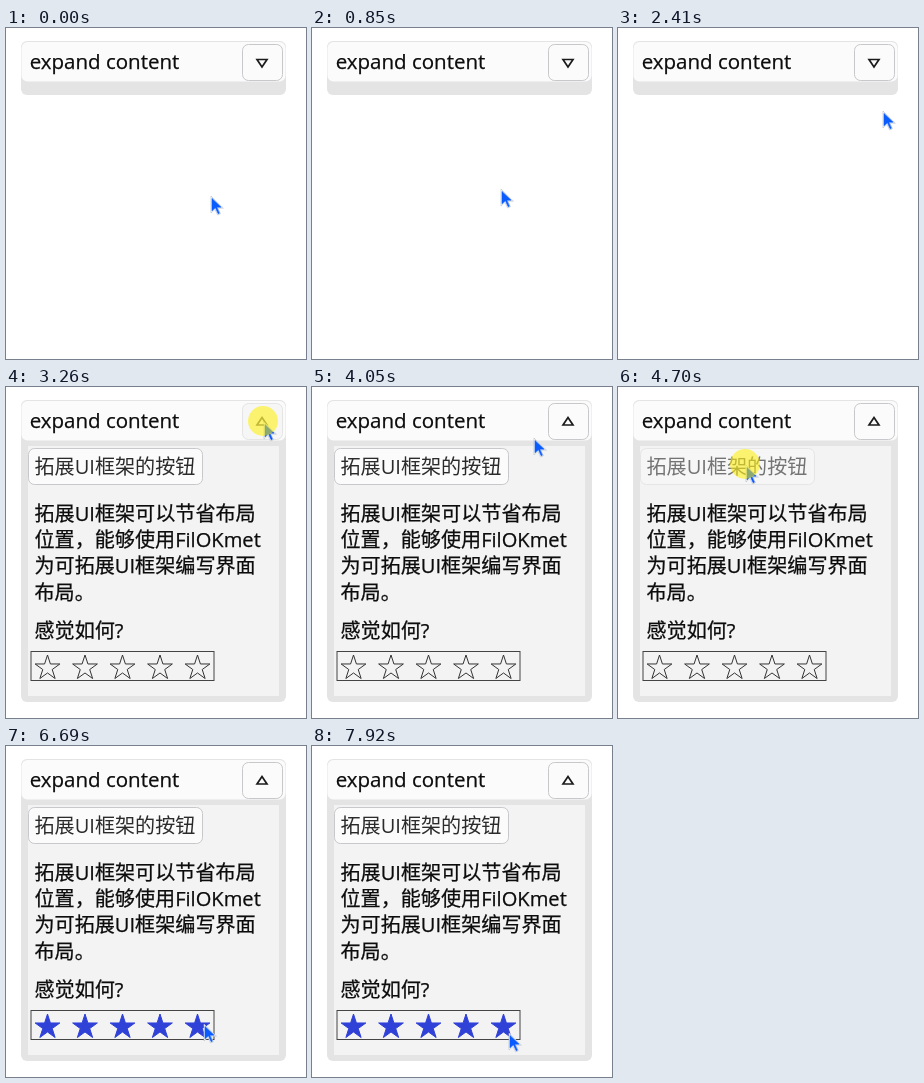
An HTML page that plays this animation: 300 px wide and 331 px high, repeating every 7990 ms.

```html
<!DOCTYPE html>
<html lang="zh-CN">
<head>
<meta charset="utf-8">
<style>
  html, body { margin: 0; width: 100%; height: 100%; overflow: hidden; background: #fff; }
  svg { display: block; font: 20.1px "Open Sans", "Noto Sans CJK SC", "Noto Sans CJK", sans-serif; }
  text { fill: #0c0c0c; stroke: #0c0c0c; stroke-width: .25; }
  .button rect { fill: #fbfbfb; stroke: #c8c8cc; }
  .button text { fill: #2b2b2b; stroke: none; }
  .button path { fill: none; stroke: #1b1b1b; stroke-width: 1.7; }
  .hover rect { fill: #f6f6f6; stroke: #e5e5e5; }
  .pressed text { fill: #747474; }
  .pressed path { stroke: #747474; }
  #stars path { fill: none; stroke: #333; }
  #stars.lit path { fill: #3041d8; stroke: #3041d8; }
  #ring { fill: #fff000; opacity: .55; }
</style>
</head>
<body>
<svg width="300" height="331" viewBox="0 0 300 331">
  <rect id="panel" x="15" y="13" width="265" height="54" rx="6" fill="#e4e4e4"/>
  <rect x="15.5" y="14" width="264" height="39.5" rx="6" fill="#fbfbfb"/>
  <text x="23.7" y="41" font-size="20.5">expand content</text>
  <g id="toggle" class="button">
    <rect x="236.5" y="16.5" width="40" height="36" rx="6"/>
    <path id="arrow"/>
  </g>
  <g id="content">
    <rect x="22" y="59" width="251" height="250" fill="#f3f3f3"/>
    <g id="action" class="button">
      <rect x="22.5" y="61.5" width="174" height="36" rx="6"/>
      <text x="28.5" y="87">拓展UI框架的按钮</text>
    </g>
    <text y="134">
      <tspan x="28.5">拓展UI框架可以节省布局</tspan>
      <tspan x="28.5" dy="26.2">位置，能够使用FilOKmet</tspan>
      <tspan x="28.5" dy="26.2">为可拓展UI框架编写界面</tspan>
      <tspan x="28.5" dy="26.2">布局。</tspan>
    </text>
    <text x="28.5" y="250.5">感觉如何?</text>
    <rect x="25" y="264.5" width="183" height="29" fill="none" stroke="#444"/>
    <g id="stars"></g>
  </g>
  <g id="cursor">
    <path d="M0 0V17L4 13.4L6.6 19L9.4 17.8L7 12.2H12.4Z" fill="#fff" stroke="#b4bcc8" stroke-width=".6"/>
    <path id="pointer" d="M1 2.4V14.8L4.4 11.8L7.2 17.8L8.4 17.2L5.8 11.2H10.2Z" stroke-width=".6"/>
    <circle id="ring" cx="-1" cy="-1" r="15"/>
  </g>
</svg>
<script>
const LOOP = 7990, STEP = 70, EXPAND = 3260, PRESS = 4700, HOLD = 500;
const BEND = 0.08;

// Where the pointer goes: start and end time, then the point it reaches
const start = { x: 205, y: 168 };
const moves = [
  { begin: 70, end: 190, x: 188, y: 163 },
  { begin: 850, end: 1330, x: 268, y: 38 },
  { begin: 1940, end: 2080, x: 265, y: 84 },
  { begin: 2410, end: 2900, x: 258, y: 35 },
  { begin: 3780, end: 4440, x: 128, y: 78 },
  { begin: 5380, end: 6010, x: 190, y: 217 },
  { begin: 6200, end: 6760, x: 197, y: 281 },
  { begin: 7170, end: 7380, x: 191, y: 280 },
  { begin: 7780, end: 7920, x: 197, y: 287 }
];
const clicks = [520, EXPAND, PRESS, 7580], CLICK_TIME = 140;

const [panel, toggle, arrow, content, action, stars, ring, cursor, pointer] =
  ["panel", "toggle", "arrow", "content", "action", "stars", "ring", "cursor", "pointer"]
    .map(id => document.getElementById(id));

function starPath(cx, cy, radius) {
  const points = Array.from({ length: 10 }, (_, i) => {
    const r = i % 2 ? radius * 0.382 : radius, a = i * Math.PI / 5;
    return (cx + r * Math.sin(a)).toFixed(2) + " " + (cy - r * Math.cos(a)).toFixed(2);
  });
  return `<path d="M${points.join("L")}Z"/>`;
}
for (let i = 0; i < 5; i++) stars.innerHTML += starPath(41.5 + 37.5 * i, 281, 13);

function pointerAt(t) {
  const last = moves.findLastIndex(move => t >= move.begin);
  if (last < 0) return start;
  const to = moves[last], from = moves[last - 1] || start;
  if (t >= to.end) return to;
  const elapsed = (Math.floor((t - to.begin) / STEP) + 0.5) * STEP;
  const u = Math.min(1, elapsed / (to.end - to.begin + STEP / 2));
  const p = u * u * (3 - 2 * u), bow = BEND * 6.75 * p * p * (1 - p);
  const dx = to.x - from.x, dy = to.y - from.y;
  return {
    x: Math.round(from.x + dx * p + dy * bow),
    y: Math.round(from.y + dy * p - dx * bow)
  };
}

function setButton(button, over, t, press) {
  const release = press + HOLD;
  button.classList.toggle("hover", over && t < release);
  button.classList.toggle("pressed", t >= press && t < release);
}

function render(t) {
  const { x, y } = pointerAt(t);
  const inside = (left, top, right, bottom) => x >= left && x <= right && y >= top && y <= bottom;
  const open = t >= EXPAND;
  const clicking = clicks.some(at => t >= at && t < at + CLICK_TIME);

  panel.setAttribute("height", open ? 302 : 54);
  content.style.display = open ? "" : "none";
  arrow.setAttribute("d", open ? "M251 38H261L256 30.5Z" : "M251 31.5H261L256 39Z");
  setButton(toggle, inside(236, 16, 277, 53), t, EXPAND);
  setButton(action, inside(22, 61, 197, 98), t, PRESS);
  stars.classList.toggle("lit", inside(25, 264, 209, 294));

  cursor.setAttribute("transform", `translate(${x} ${y})`);
  ring.style.display = clicking ? "" : "none";
  pointer.style.fill = pointer.style.stroke = clicking ? "#0050ff" : "#0a5cff";
}

function tick() {
  render(performance.now() % LOOP);
  requestAnimationFrame(tick);
}
tick();
</script>
</body>
</html>
```
